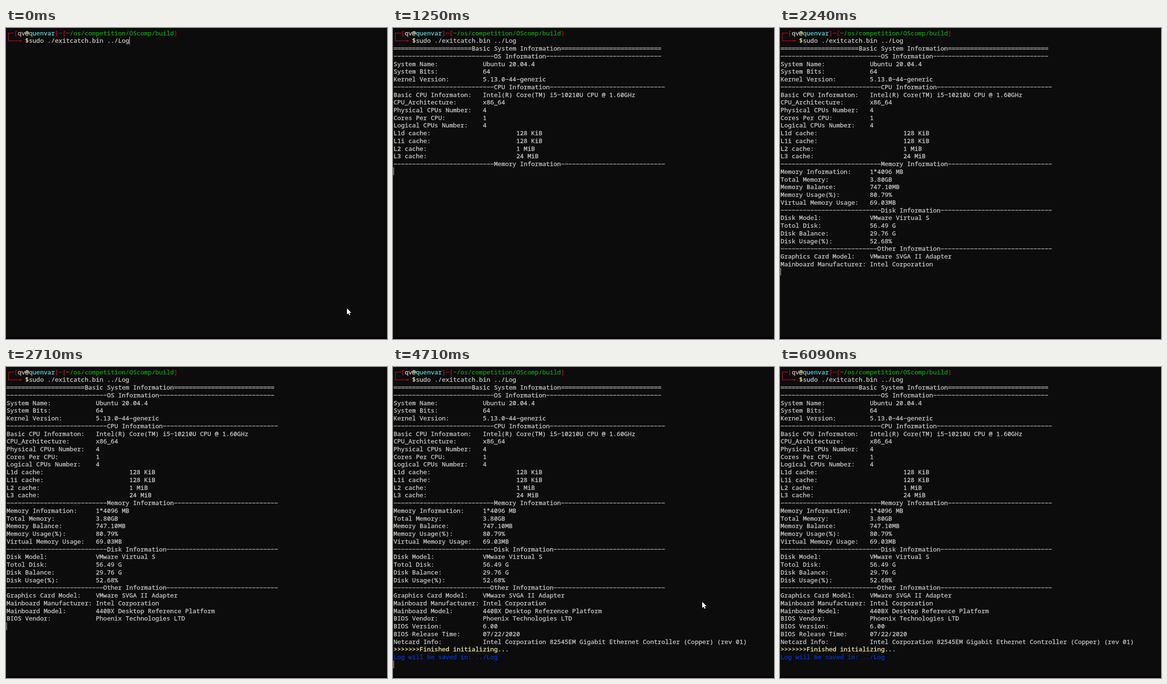
Animation of 828 by 676 pixels, one loop 6490 ms. Source, as an HTML page with a canvas:

```html
<!DOCTYPE html>
<html lang="en">
<head>
<meta charset="utf-8">
<title>Terminal session</title>
<style>
  html, body { margin: 0; width: 828px; height: 676px; overflow: hidden; background: #0c0c0c; }
  canvas { display: block; }
</style>
</head>
<body>
<canvas id="stage" width="828" height="676"></canvas>
<script>
const LOOP = 6490, W = 828, H = 676;
const CELL = 8.083, LINE = 16.74, LEFT = 1.2, TOP = 2.6;
const FG = '#cccccc', RED = '#c50f1f', GREEN = '#13a10e', CYAN = '#61d6d6',
      YELLOW = '#f9f1a5', BLUE = '#0037da';

const ctx = document.getElementById('stage').getContext('2d');
const rowTop = row => TOP + row * LINE;
const colLeft = col => LEFT + col * CELL;

const rule = (title, before, after, mark = '-') => mark.repeat(before) + title + mark.repeat(after);
const field = (label, value, col = 24) => label.padEnd(col) + value;

// A line is a plain string or a list of [text, colour] runs.
const lines = [
  [['┌─[', RED], ['qv', FG], ['@', YELLOW], ['quenvar', CYAN], [']─[', RED],
   ['~/os/competition/OScomp/build', GREEN], [']', RED]],
  [['└──╼ ', RED], ['$', YELLOW], ['sudo ./exitcatch.bin ../Log', FG]],
  rule('Basic System Information', 21, 27, '='),
  rule('OS Information', 27, 31),
  field('System Name:', 'Ubuntu 20.04.4'),
  field('System Bits:', '64'),
  field('Kernel Version:', '5.13.0-44-generic'),
  rule('CPU Information', 27, 31),
  field('Basic CPU Informaton:', 'Intel(R) Core(TM) i5-10210U CPU @ 1.60GHz'),
  field('CPU_Architecture:', 'x86_64'),
  field('Physical CPUs Number:', '4'),
  field('Cores Per CPU:', '1'),
  field('Logical CPUs Number:', '4'),
  field('L1d cache:', '128 KiB', 33),
  field('L1i cache:', '128 KiB', 33),
  field('L2 cache:', '1 MiB', 33),
  field('L3 cache:', '24 MiB', 33),
  rule('Memory Information', 27, 28),
  field('Memory Information:', '1*4096 MB'),
  field('Total Memory:', '3.80GB'),
  field('Memory Balance:', '747.10MB'),
  field('Memory Usage(%):', '80.79%'),
  field('Virtual Memory Usage:', '69.03MB'),
  rule('Disk Information', 27, 30),
  field('Disk Model:', 'VMware Virtual S'),
  field('Totol Disk:', '56.49 G'),
  field('Disk Balance:', '29.76 G'),
  field('Disk Usage(%):', '52.68%'),
  rule('Other Information', 26, 30),
  field('Graphics Card Model:', 'VMware SVGA II Adapter'),
  field('Mainboard Manufacturer:', 'Intel Corporation'),
  field('Mainboard Model:', '440BX Desktop Reference Platform'),
  field('BIOS Vendor:', 'Phoenix Technologies LTD'),
  field('BIOS Version:', '6.00'),
  field('BIOS Release Time:', '07/22/2020'),
  field('Netcard Info:', 'Intel Corporation 82545EM Gigabit Ethernet Controller (Copper) (rev 01)'),
  [['>>>>>>>Finished initializing...', YELLOW]],
  [['Log will be saved in: ../Log', BLUE]]
];

// [time, number of lines printed]
const output = [[0, 2], [1100, 8], [1170, 10], [1250, 18], [1510, 25], [1910, 29], [1980, 30],
  [2240, 31], [2510, 32], [2710, 33], [2910, 34], [3110, 35], [3310, 36], [3380, 37], [3440, 38]];
const caretOff = [[1710, 2240], [2780, 3310], [3910, 4440], [4990, 5540], [6090, LOOP]];

// Line-drawing characters and dashes span their cell: [x, y, width, height] from its left middle.
const strokes = {
  '┌': [[3.5, 0, 1.2, 9], [3.5, 0, 4.7, 1.2]],
  '└': [[3.5, -8, 1.2, 9], [3.5, 0, 4.7, 1.2]],
  '─': [[0, 0, 8.2, 1.2]],
  '╼': [[0, 0, 4.2, 1.2], [4, -0.6, 4.2, 2.4]],
  '-': [[0.6, 0, 6.9, 1.2]],
  '=': [[0.3, -1.6, 7.5, 1.2], [0.3, 1.5, 7.5, 1.2]]
};

function drawCell(g, char, row, col) {
  const x = colLeft(col);
  if (strokes[char]) {
    const middle = rowTop(row) + 8;
    for (const [dx, dy, w, h] of strokes[char]) g.fillRect(x + dx, middle + dy, w, h);
  } else {
    const baseline = Math.round(rowTop(row) + 13);
    g.fillText(char, x, baseline);
    g.strokeText(char, x, baseline);
  }
}

// A hairline stroke gives the glyphs a slightly heavier weight.
function renderText() {
  const sheet = document.createElement('canvas');
  sheet.width = W;
  sheet.height = H;
  const g = sheet.getContext('2d');
  g.font = '13.47px "Noto Sans Mono", "DejaVu Sans Mono", monospace';
  g.lineWidth = 0.3;
  g.lineJoin = 'round';
  lines.forEach((line, row) => {
    let col = 0;
    for (const [text, colour] of Array.isArray(line) ? line : [[line, FG]]) {
      g.fillStyle = g.strokeStyle = colour;
      for (const char of text) drawCell(g, char, row, col++);
    }
  });
  return sheet;
}
const textSheet = renderText();

const mix = (a, b, k) => a + (b - a) * k;

// The pointer jumps from one sampled position to the next.
function pointerAt(t) {
  if (t < 570) {
    const k = Math.min(6, Math.max(0, Math.floor((t - 70) / 72) + 1)) / 6;
    const eased = k * k * (3 - 2 * k);
    return [mix(741, 648, eased), mix(609.5, 487, eased)];
  }
  if (t < 970) return [660, 493];
  if (t < 1050) return [659, 498];
  if (t < 4640 || t >= 5270) return null;
  if (t < 4710) return [661, 500];
  const k = Math.floor((t - 4710) / 70) / 7;
  return [mix(672, 784, k), mix(510.5, 665, k)];
}

const arrow = new Path2D('M0 0V13.2L3.1 10.4L5.1 15L7.2 14.1L5.2 9.6H9.4Z');

function drawPointer([x, y]) {
  ctx.save();
  ctx.translate(x, y);
  ctx.strokeStyle = '#000';
  ctx.lineWidth = 1;
  ctx.stroke(arrow);
  ctx.fillStyle = '#fff';
  ctx.fill(arrow);
  ctx.restore();
}

function drawCaret(t, row) {
  if (caretOff.some(([from, to]) => t >= from && t < to)) return;
  const typing = t < 970;
  ctx.fillStyle = FG;
  ctx.fillRect(typing ? 268 : 1, Math.floor(rowTop(typing ? 1 : row)), 1, 17);
}

function draw() {
  const t = performance.now() % LOOP;
  const count = output.findLast(([time]) => t >= time)[1];
  const shown = Math.round(rowTop(count));
  ctx.fillStyle = '#0c0c0c';
  ctx.fillRect(0, 0, W, H);
  ctx.drawImage(textSheet, 0, 0, W, shown, 0, 0, W, shown);
  drawCaret(t, count);
  ctx.fillStyle = '#080106';
  ctx.fillRect(0, 672, W, 4);
  const pointer = pointerAt(t);
  if (pointer) drawPointer(pointer);
  requestAnimationFrame(draw);
}
draw();
</script>
</body>
</html>
```
